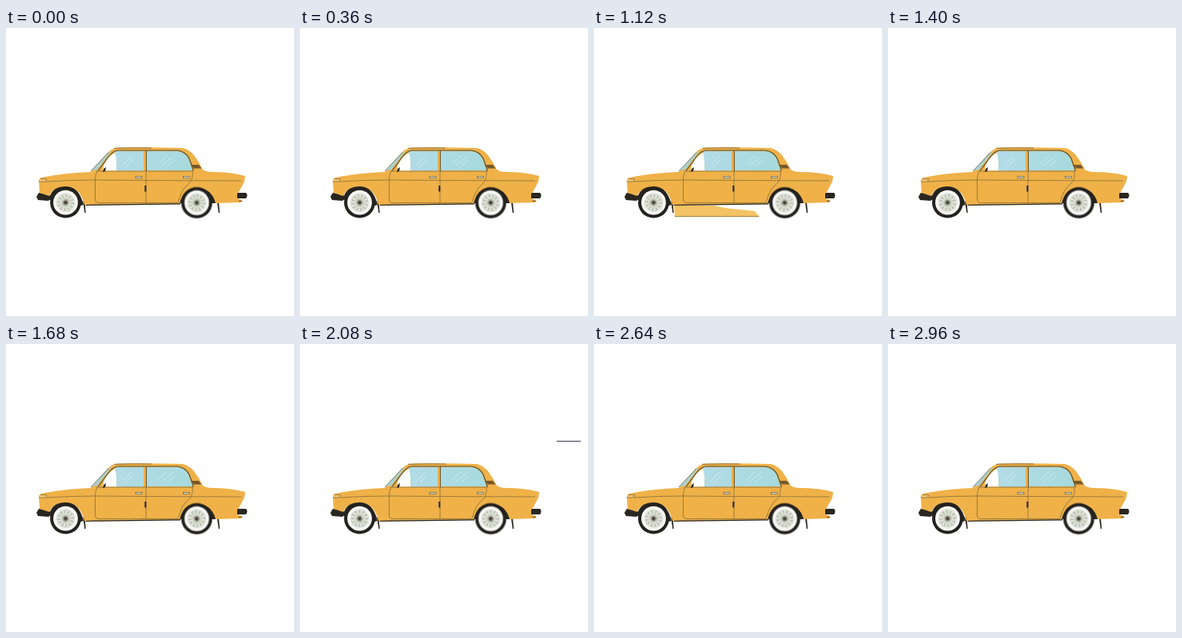
Write an HTML page without scripts that moves like this. It is 360 by 360 pixels and loops after 3000 ms.

```html
<!DOCTYPE html>
<html lang="en">
<head>
<meta charset="utf-8">
<title>Yellow car</title>
<style>
html, body { margin: 0; width: 100%; height: 100%; overflow: hidden; background: #fff; }
svg { display: block; width: 100vw; height: 100vh; }
.ink { fill: none; stroke: #87703a; stroke-width: .8; }
.dark { fill: #2a2721; }
.glass { fill: url(#sky); }
.shine { fill: none; stroke: #d6edf0; stroke-width: .8; }
.spin { animation: spin 600ms steps(15) -5ms infinite; }
.streak { fill: #3e4058; }
.high { animation: high 3s -5ms infinite; }
.low { animation: low 3s -5ms infinite; }
.under { opacity: 0; animation: under 3s step-end -5ms infinite; }
@keyframes spin { to { transform: rotate(-360deg); } }
@keyframes high {
  0%, 68% { transform: translateX(360px); animation-timing-function: steps(10); }
  81.333%, 100% { transform: translateX(-30px); }
}
@keyframes low {
  0%, 70.667% { transform: translateX(360px); animation-timing-function: steps(10); }
  84%, 100% { transform: translateX(-30px); }
}
@keyframes under {
  0% { opacity: 0; }
  37.333% { opacity: 1; }
  38.667%, 100% { opacity: 0; }
}
</style>
</head>
<body>
<svg viewBox="0 0 360 360">
  <defs>
    <linearGradient id="sky" gradientUnits="userSpaceOnUse" x1="137" x2="234" y1="0" y2="0">
      <stop stop-color="#b2dbe6"/>
      <stop offset="1" stop-color="#a6dadd"/>
    </linearGradient>
    <g id="wheel">
      <circle r="19.4" fill="#24221f"/>
      <circle r="15.4" fill="#f6f6f3"/>
      <g class="spin">
        <circle r="11" fill="#e2e5dc" stroke="#c3c7ba" stroke-width=".7"/>
        <circle r="8.3" fill="none" stroke="#b4b9a9" stroke-width="4" stroke-dasharray="1.6 2.746"/>
        <circle r="5.6" fill="#c1c7b6" stroke="#dfe3d8"/>
        <circle r="3" fill="#7c7a6c"/>
        <circle r="1.8" fill="#40392e"/>
        <circle cx="1" cy="-3.9" r=".7" fill="#8b8d80"/>
      </g>
    </g>
    <path id="flap" class="dark" d="M-1.2 -4L1 -2L2.2 11L.8 11L-.4 3Z"/>
  </defs>

  <rect class="streak high" y="121" width="30" height="1"/>
  <rect class="streak low" y="264" width="30" height="1"/>
  <g class="under">
    <path fill="#f4c365" d="M100 221L150 222Q166 226 184 227L201 229L207 236L101 236Z"/>
    <path class="ink" d="M101 235.6H206"/>
  </g>

  <!-- bumpers, arches and sill -->
  <path class="dark" d="M38 211L41 206L54 208L57 213L53 216L40 215Z"/>
  <path class="dark" d="M289 206L300 206Q303 209 300 213L289 213Z"/>
  <path class="dark" d="M54 213Q58 197 75 197Q91 198 97 221L90 223L58 219Z"/>
  <path class="dark" d="M217 219Q220 197 238.5 197Q257 198 263 219Z"/>
  <path class="dark" d="M98 219H218V220.6L100 222Z"/>
  <use href="#flap" x="97.5" y="220"/>
  <use href="#flap" x="265" y="220"/>

  <!-- body -->
  <path fill="#efb148" d="M41 190Q42 187 49 186Q76 181 106 180L128 155Q133 150 140 149.5Q180 148.6 221 150Q229 152 235 159Q241 167 246 177Q250 180 258 180Q281 180 299 185L298 192L291 205L289 207V213L295 215L293 218L262 219Q257 200 238.5 200Q222 200 217 219.3L112 220.6L98 221Q93 199 75 198Q59 198 54 210L42 206Z"/>
  <path fill="#fff" opacity=".35" d="M42 190L50 189V191L42 192Z"/>
  <path class="ink" d="M41 192H49L51 189L43 188"/>
  <path class="ink" d="M50 192Q80 190 112 190L175 190.5L294 191"/>

  <!-- windows -->
  <path fill="#acd0cf" d="M107 178L128 156L132 153.5L114 177Z"/>
  <path fill="none" stroke="#59604f" stroke-width=".8" d="M106 179L128 155.5"/>
  <path fill="#fff" d="M121 178.5L122 172Q127 160 138 155L138 178.5Z"/>
  <path class="glass" d="M137 154H172V178.5H138Q139 165 136 156Z"/>
  <path class="glass" d="M176 154H214Q224 155 228 163L233 178H176Z"/>
  <path class="shine" d="M145 172L157 160M149 174L159 164M190 170L202 159M194 172L209 161M202 172L211 165"/>
  <path fill="none" stroke="#55503a" stroke-width="1.2" d="M115 178.5L128 161Q134 153 141 153H214Q224 154 229 163L234.5 178.5"/>
  <path class="ink" stroke="#655a3c" d="M113 179H234"/>
  <path fill="none" stroke="#55503a" stroke-width="1" d="M175.4 153V179"/>
  <path fill="none" stroke="#765c2a" stroke-width=".8" d="M135 150.3Q160 149.5 182 150"/>
  <path class="dark" d="M121 180L122 176L125 174L124 179Z"/>
  <path fill="#775829" d="M231.5 171H241L244.5 175.5H235Z"/>

  <!-- doors -->
  <path class="ink" d="M114 179Q111 184 111.5 195V215Q112 218 115 218.5H175V179M233 178Q234 188 230 193Q219 201 215 218.5H175"/>
  <g fill="#dcd9c8" stroke="#6a634b" stroke-width=".7">
    <rect x="162" y="185.5" width="8" height="2.2"/>
    <rect x="221.5" y="185.5" width="8" height="2.2"/>
  </g>
  <rect class="dark" x="173.3" y="197" width="2" height="7.5"/>
  <ellipse cx="293" cy="216.5" rx="2.5" ry="1" fill="#9e6c2a"/>

  <use href="#wheel" transform="translate(74.5 218.2)"/>
  <use href="#wheel" transform="translate(238.4 218.4)"/>
</svg>
</body>
</html>
```
